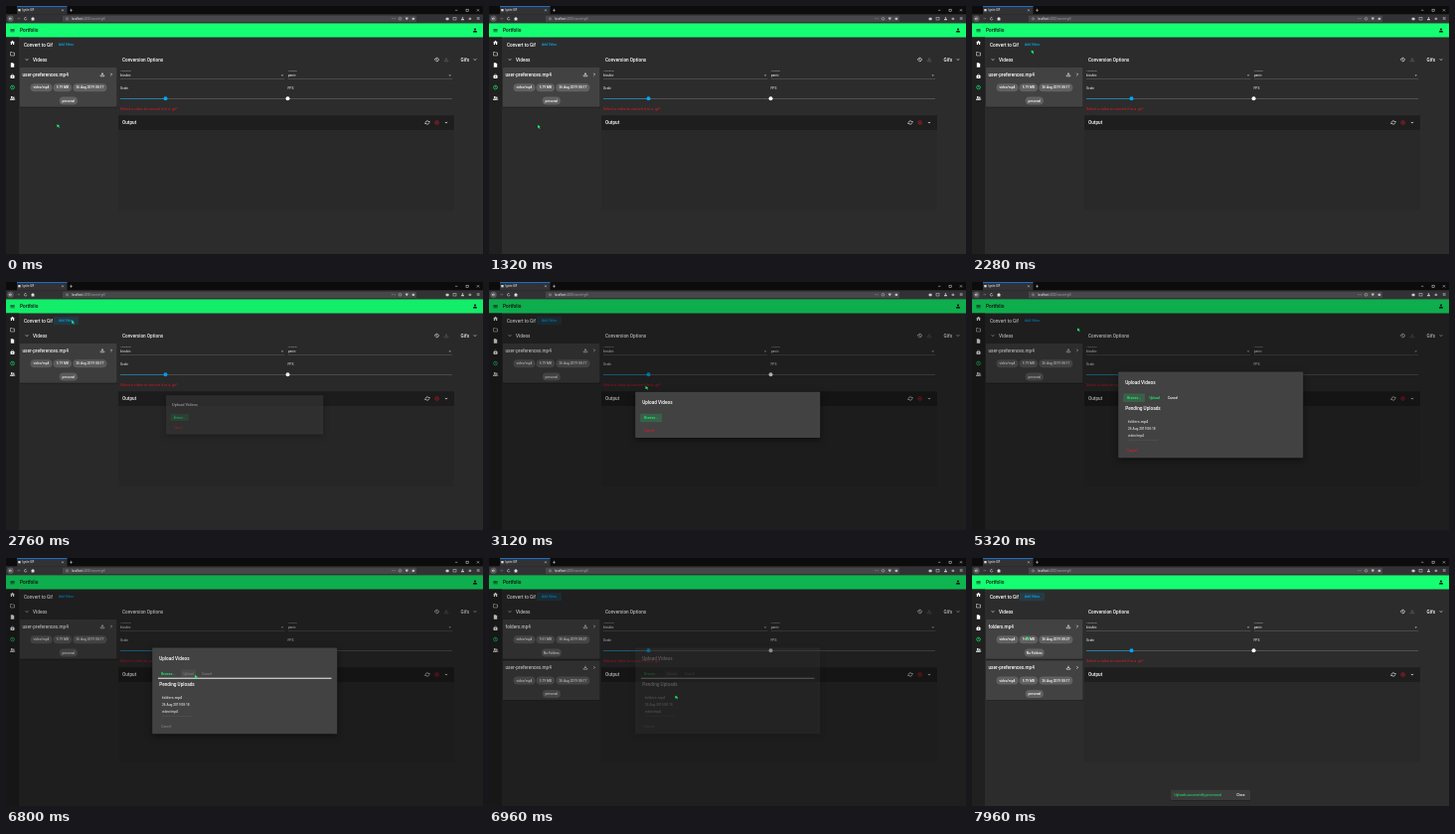
Animation, 480 px wide and 250 px high, one loop 8000 ms. Source, as an HTML page with a canvas:

```html
<!DOCTYPE html>
<html lang="en">
<head>
<meta charset="utf-8">
<title>Convert to Gif</title>
<style>
html, body { margin: 0; width: 100%; height: 100%; overflow: hidden; background: #2c2c2c; }
canvas { display: block; width: 480px; height: 250px; }
</style>
</head>
<body>
<canvas id="stage"></canvas>
<script>
const canvas = document.getElementById('stage');
const ctx = canvas.getContext('2d');
const dpr = window.devicePixelRatio || 1;
canvas.width = 480 * dpr;
canvas.height = 250 * dpr;

const LOOP = 8000;
const GREEN = '#14ff72', BLUE = '#03a9f4', RED = '#e0182d', WHITE = '#fff', GREY = '#7d7d7d';
const HEAD = 4.7, BODY = 3.3;

const clamp = v => Math.max(0, Math.min(1, v));
const ramp = (t, from, length) => clamp((t - from) / length);
const smooth = p => p * p * (3 - 2 * p);

function rect(x, y, w, h, color, r = 0) {
  ctx.fillStyle = color;
  ctx.beginPath();
  ctx.roundRect(x, y, w, h, r);
  ctx.fill();
}

function disc(x, y, r, color) {
  ctx.fillStyle = color;
  ctx.beginPath();
  ctx.arc(x, y, r, 0, 7);
  ctx.fill();
}

function arc(x, y, r, color, from = 0, to = Math.PI * 2, width = 0.6) {
  ctx.strokeStyle = color;
  ctx.lineWidth = width;
  ctx.beginPath();
  ctx.arc(x, y, r, from, to);
  ctx.stroke();
}

function line(points, color, width = 0.6) {
  ctx.strokeStyle = color;
  ctx.lineWidth = width;
  ctx.beginPath();
  points.forEach(([x, y]) => ctx.lineTo(x, y));
  ctx.stroke();
}

function shape(points, color) {
  ctx.fillStyle = color;
  ctx.beginPath();
  points.forEach(([x, y]) => ctx.lineTo(x, y));
  ctx.fill();
}

// y is the middle of the capitals
function text(s, x, y, size = BODY, color = WHITE, weight = 400, align = 'left') {
  ctx.font = `${weight} ${size}px Roboto, sans-serif`;
  ctx.textAlign = align;
  ctx.fillStyle = color;
  ctx.fillText(s, x, y + size * 0.355);
}

const heading = (s, x, y, color) => text(s, x, y, HEAD, color, 500);
const label = (s, x, y, color) => text(s, x, y, BODY, color, 500, 'center');

function chevron(x, y, dir) {
  const d = 1.2;
  line(dir === 'right'
    ? [[x - d / 2, y - d], [x + d / 2, y], [x - d / 2, y + d]]
    : dir === 'up'
      ? [[x - d, y + d / 2], [x, y - d / 2], [x + d, y + d / 2]]
      : [[x - d, y - d / 2], [x, y + d / 2], [x + d, y - d / 2]], WHITE, 0.7);
}

function download(x, y, color) {
  line([[x - 1.8, y + 0.5], [x - 1.8, y + 1.8], [x + 1.8, y + 1.8], [x + 1.8, y + 0.5]], color);
  line([[x, y - 1.8], [x, y]], color);
  shape([[x - 1.1, y - 0.4], [x + 1.1, y - 0.4], [x, y + 0.9]], color);
}

function person(x, y, color, s = 1) {
  disc(x, y - s, s, color);
  rect(x - 1.9 * s, y + 0.4 * s, 3.8 * s, 1.5 * s, color, [0.9 * s, 0.9 * s, 0, 0]);
}

function browser() {
  rect(0, 0, 480, 8.5, '#0c0c0d');
  rect(11, 0, 50.5, 8.5, '#323234');
  rect(11, 0, 50.5, 0.8, '#0a84ff');
  rect(12.3, 3, 2.3, 2.3, '#ddd');
  text('Ignite GIF', 16.5, 4.4, 2.8, '#f4f4f4');
  const cross = (x, y, d) => {
    line([[x - d, y - d], [x + d, y + d]], '#ddd', 0.5);
    line([[x - d, y + d], [x + d, y - d]], '#ddd', 0.5);
  };
  cross(57, 4.3, 0.9);
  line([[64, 4.3], [67, 4.3]], '#ddd', 0.5);
  line([[65.5, 2.8], [65.5, 5.8]], '#ddd', 0.5);
  line([[452, 4.3], [454.4, 4.3]], '#ddd', 0.5);
  ctx.strokeRect(463, 3.2, 2.2, 2.2);
  cross(475, 4.3, 1.1);

  rect(0, 8.5, 480, 8.7, '#323234');
  disc(4.5, 12.8, 3.2, '#58585a');
  line([[6, 12.8], [3.2, 12.8], [4.4, 11.6]], '#eee');
  line([[3.2, 12.8], [4.4, 14]], '#eee');
  line([[11.4, 12.8], [14, 12.8], [12.9, 11.7]], '#888', 0.5);
  arc(19.7, 12.8, 1.3, '#ddd', 0.3, 5.4);
  shape([[25, 13], [27, 11], [29, 13], [28.4, 13], [28.4, 14.6], [25.6, 14.6], [25.6, 13]], '#ddd');
  rect(57, 9.7, 356, 6.4, '#474749', 0.5);
  arc(61.5, 12.8, 1, '#bbb', 0, 7, 0.5);
  text('localhost', 66, 12.8, 2.8, '#f4f4f4');
  ctx.font = '400 2.8px Roboto, sans-serif';
  text(':4200/convert-gif/', 66 + ctx.measureText('localhost').width, 12.8, 2.8, '#a5a5a7');
  for (let i = 0; i < 3; i++) disc(388.8 + i * 1.2, 12.8, 0.35, '#ddd');
  arc(396.5, 12.8, 1.3, '#ccc', 0, 7, 0.5);
  shape([[402, 11.5], [404.6, 11.5], [404.6, 12.8], [403.3, 14.2], [402, 12.8]], '#bbb');
  rect(408.7, 11.7, 2.4, 2.3, '#bbb', 0.5);
  rect(442.6, 11.7, 3, 2.5, '#ccc', 0.4);
  ctx.strokeStyle = '#ccc';
  ctx.strokeRect(450, 11.7, 3, 2.3);
  person(459.5, 12.8, '#ccc', 0.8);
  rect(465.6, 11.7, 2.6, 2.3, '#999', 0.4);
  for (let i = 0; i < 3; i++) rect(473.8, 11.6 + i, 2.8, 0.4, '#ddd');
}

function sidebar() {
  rect(0, 31.5, 13, 218.5, '#202020');
  const x = 6.5;
  shape([[x - 2.4, 37], [x, 34.8], [x + 2.4, 37], [x + 1.7, 37], [x + 1.7, 39], [x + 0.5, 39],
    [x + 0.5, 37.5], [x - 0.5, 37.5], [x - 0.5, 39], [x - 1.7, 39], [x - 1.7, 37]], WHITE);
  line([[x - 2, 46.5], [x - 0.4, 46.5], [x + 0.2, 47.1], [x + 2, 47.1], [x + 2, 50],
    [x - 2, 50], [x - 2, 46.5]], WHITE, 0.5);
  shape([[x - 1.7, 57.2], [x + 0.5, 57.2], [x + 1.7, 58.4], [x + 1.7, 61.8], [x - 1.7, 61.8]], WHITE);
  rect(x - 2, 70, 4, 3, WHITE, 0.4);
  arc(x, 70, 1.1, WHITE, Math.PI, 0);
  disc(x, 71.4, 0.5, '#202020');
  arc(x, 82, 1.9, GREEN);
  line([[x, 80.8], [x, 82.1], [x + 0.9, 82.6]], GREEN, 0.5);
  person(x - 0.7, 93, WHITE, 0.95);
  person(x + 1.3, 93.1, WHITE, 0.75);
}

function toolbar() {
  rect(0, 17.2, 480, 14.3, GREEN);
  for (let i = 0; i < 3; i++) rect(4.4, 23 + i * 1.3, 4.2, 0.55, '#111');
  heading('Portfolio', 14, 24.5, '#111');
  person(472, 24.6, '#111', 1.05);
}

function chip(s, x, y, w) {
  rect(x - w / 2, y - 4, w, 8, '#616161', 4);
  label(s, x, y);
}

function card(y, name, size, date, tag) {
  rect(14, y + 0.5, 98, 40, '#1d1d1d', 0.8);
  rect(14, y, 97.6, 39.8, '#424242', 0.8);
  heading(name, 16.5, y + 7);
  download(97, y + 7, WHITE);
  chevron(106, y + 7, 'right');
  chip('video/mp4', 35.5, y + 20.2, 22);
  chip(size, 56.8, y + 20.2, 18.5);
  chip(date, 84.4, y + 20.2, 34);
  chip(tag, 62.8, y + 33.5, tag.length * 0.9 + 11);
}

function select(x, name, value) {
  text(name, x, 65.3, 2.5, '#bdbdbd');
  text(value, x, 70);
  rect(x, 73, 165.5, 0.35, '#a0a0a0');
  shape([[x + 161.8, 69.6], [x + 164.2, 69.6], [x + 163, 70.8]], '#c5c5c5');
}

function page(t) {
  rect(0, 17, 480, 233, '#2c2c2c');
  toolbar();
  sidebar();

  heading('Convert to Gif', 18, 39);
  if ((t > 2520 && t < 3280) || t > 6920) rect(48, 34.8, 25, 8.4, 'rgba(3,169,244,.13)', 0.8);
  text('Add Video', 60.5, 39, BODY, BLUE, 500, 'center');

  chevron(21, 54, 'down');
  heading('Videos', 27, 54);
  if (t >= 6920) card(62, 'folders.mp4', '9.61 MB', '26 Aug 2019 08:27', 'No Folders');
  card(t >= 6920 ? 103.4 : 62, 'user-preferences.mp4', '5.79 MB', '26 Aug 2019 08:17', 'personal');

  heading('Conversion Options', 117, 54);
  arc(433.6, 54, 1.8, WHITE, -2.6, 2.4);
  line([[433.6, 53], [433.6, 54.2], [434.4, 54.7]], WHITE, 0.5);
  shape([[430.8, 53.6], [432.8, 53.6], [431.8, 54.8]], WHITE);
  download(443, 54, '#666');
  heading('Gifs', 457.6, 54);
  chevron(472, 54, 'down');

  select(115, 'Algorithm', 'bicubic');
  select(283.7, 'Logging', 'panic');
  text('Scale', 115, 83.2);
  text('FPS', 283.5, 83.2);
  rect(115, 93, 165.5, 0.5, '#777');
  rect(115, 93, 45.5, 0.5, BLUE);
  disc(160.5, 93.2, 2, BLUE);
  rect(283.5, 93, 165.5, 0.5, '#777');
  disc(283.5, 93.2, 2, WHITE);
  text('Select a video to convert it to a .gif!', 115, 103.8, 3.7, RED);

  rect(113, 125, 338, 81, '#292929');
  rect(113, 110.3, 338, 14.8, '#1e1e1e');
  heading('Output', 117, 117.5);
  arc(424, 117.5, 1.7, WHITE, 0.3, 2.8);
  arc(424, 117.5, 1.7, WHITE, 3.4, 5.9);
  shape([[425, 117.3], [427, 117.3], [426, 116.1]], WHITE);
  shape([[421, 117.7], [423, 117.7], [422, 118.9]], WHITE);
  arc(433.6, 117.5, 1.8, RED);
  line([[432.8, 116.7], [434.4, 118.3]], RED, 0.5);
  line([[432.8, 118.3], [434.4, 116.7]], RED, 0.5);
  chevron(443, 117.5, 'down');
}

function dialog(t) {
  const pending = t >= 5320, busy = t >= 6400;
  const top = pending ? 90.6 : 110.8, bottom = pending ? 177.3 : 156.9;
  const show = smooth(ramp(t, 2680, 160)) * (1 - ramp(t, 6900, 80));
  if (!show) return;

  ctx.save();
  ctx.globalAlpha = show;
  if (t < 3000) {
    const s = 0.7 + 0.3 * show, cy = (top + bottom) / 2;
    ctx.translate(240, cy);
    ctx.scale(s, s);
    ctx.translate(-240, -cy);
  }
  ctx.shadowColor = 'rgba(0,0,0,.5)';
  ctx.shadowBlur = 6 * dpr;
  ctx.shadowOffsetY = 2 * dpr;
  rect(147.2, top, 186, bottom - top, '#424242', 0.9);
  ctx.shadowColor = 'transparent';

  heading('Upload Videos', 154.2, top + 10.8);
  const row = top + 26.2;
  if (t < 6240) rect(152.2, row - 4.2, 21.8, 8.4, 'rgba(20,255,114,.17)', 0.8);
  label('Browse...', 163.1, row, GREEN);

  if (pending) {
    if (t >= 6240) rect(176, row - 4.2, 15, 8.4, busy ? 'rgba(255,255,255,.05)' : 'rgba(20,255,114,.13)', 0.8);
    label('Upload', 183.6, row, busy ? GREY : GREEN);
    label('Cancel', 202, row, busy ? GREY : WHITE);
    if (busy) {
      rect(153, 120.8, 174.5, 0.9, '#5a5a5a');
      rect(153, 120.8, 174.5 * ramp(t, 6440, 240), 0.9, '#e8e8e8');
    }
    heading('Pending Uploads', 154.2, 127);
    text('folders.mp4', 157, 140.5, 3.75);
    text('26 Aug 2019 08:18', 157, 147.8);
    text('video/mp4', 157, 154.4);
    rect(157, 159, 30.5, 0.35, '#5c5c5c');
  }
  label('Cancel', 161.4, bottom - 7.5, busy ? GREY : RED);
  ctx.restore();
}

function snackbar(t) {
  const show = smooth(ramp(t, 7000, 160));
  if (!show) return;
  ctx.save();
  ctx.globalAlpha = show;
  const s = 0.8 + 0.2 * show;
  ctx.translate(240, 239);
  ctx.scale(s, s);
  ctx.translate(-240, -239);
  rect(200, 233.4, 80, 11, '#1b1b1b', 1);
  rect(200, 233.4, 80, 10.6, '#3b3b3b', 1);
  text('Uploads successfully processed', 203.6, 238.9, BODY, GREEN);
  label('Close', 270.4, 238.9);
  ctx.restore();
}

// time, x, y of the pointer tip
const route = [
  [0, 51.3, 119.2], [1120, 51.3, 119.2], [1520, 46.6, 121], [1720, 46.6, 121],
  [2280, 59.7, 44.6], [2480, 63.6, 37.6], [2720, 63.6, 37.6], [3120, 157.4, 105],
  [3320, 160.5, 138], [3640, 161, 141.5], [4200, 159, 138], [4400, 151.8, 107],
  [4980, 106, 46.4], [5540, 106, 46.4], [5760, 102, 60], [6300, 186.3, 117],
  [6560, 190, 118], [6840, 190, 118], [7140, 182.5, 177], [7240, 182.5, 177],
  [7920, 54.8, 79.2], [8000, 54.8, 79.2]
];

function slope(i, axis) {
  const a = route[i - 1], b = route[i], c = route[i + 1];
  if (!a || !c) return 0;
  const before = (b[axis] - a[axis]) / (b[0] - a[0]);
  const after = (c[axis] - b[axis]) / (c[0] - b[0]);
  return before * after <= 0 ? 0 : 2 * before * after / (before + after);
}

function along(t, axis) {
  let i = 0;
  while (i < route.length - 2 && t >= route[i + 1][0]) i++;
  const a = route[i], b = route[i + 1], d = b[0] - a[0], p = (t - a[0]) / d;
  const q = smooth(p);
  return a[axis] * (1 - q) + b[axis] * q
    + d * p * (1 - p) * ((1 - p) * slope(i, axis) - p * slope(i + 1, axis));
}

function pointer(t) {
  const x = along(t, 1), y = along(t, 2);
  shape([[x, y], [x + 2.8, y + 1.5], [x + 1.7, y + 1.9], [x + 2.6, y + 3.3],
    [x + 1.8, y + 3.6], [x + 1.1, y + 2.3], [x + 0.2, y + 3]], GREEN);
}

function draw(now) {
  const t = Math.floor((now % LOOP) / 40) * 40;
  ctx.setTransform(dpr, 0, 0, dpr, 0, 0);
  page(t);
  const dim = 0.32 * smooth(ramp(t, 2640, 400)) * (1 - smooth(ramp(t, 6900, 320)));
  rect(0, 17.2, 480, 232.8, `rgba(0,0,0,${dim})`);
  browser();
  dialog(t);
  snackbar(t);
  pointer(t);
  requestAnimationFrame(draw);
}

requestAnimationFrame(draw);
</script>
</body>
</html>
```
